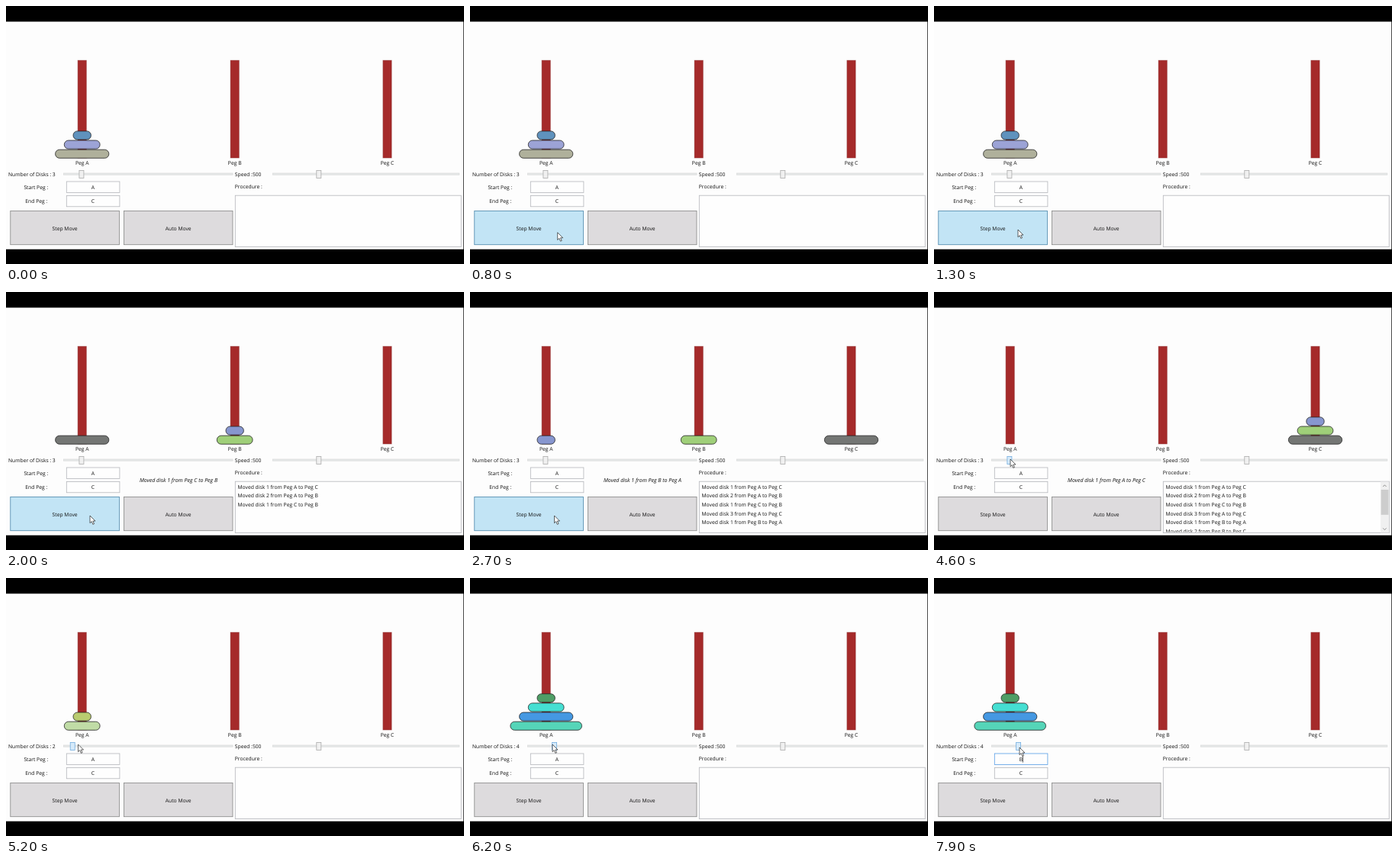
An HTML page that plays this animation: 600 px wide and 338 px high, repeating every 8000 ms.

```html
<!DOCTYPE html>
<html lang="en">
<head>
<meta charset="utf-8">
<title>Disks and pegs</title>
<style>
  html, body { margin: 0; width: 100%; height: 100%; overflow: hidden; background: #000; }
  svg { display: block; width: 100vw; height: 100vh; }
  text { font: 6.75px "Open Sans", "Noto Sans", sans-serif; fill: #111; text-rendering: geometricPrecision; }
  .mid { text-anchor: middle; }
  .note { font-size: 7px; font-style: italic; }
</style>
</head>
<body>
<svg id="stage" viewBox="0 0 600 338"></svg>
<script>
const LOOP = 8000, STEP = 100;
const PEGS = { A: 99.7, B: 299.7, C: 499.5 };
const MOVES = ['1AC', '2AB', '1CB', '3AC', '1BA', '2BC', '1AC'];
const FIRST_MOVE = 1400, MOVE_GAP = 300;

// Each entry starts a fresh stack; colours run from smallest to largest disk.
const STACKS = [
  { at: 0, colors: ['#5f92bd', '#9ca3d6', '#afb09b'] },
  { at: FIRST_MOVE, colors: ['#8796cf', '#9fcf79', '#747674'] },
  { at: 5000, colors: ['#b9cc70', '#c0dca6'] },
  { at: 5500, colors: ['#c48f9f', '#86b7c9', '#d0b26c'] },
  { at: 5900, colors: ['#4f9e66', '#45dfd2', '#4598e2', '#55d5b8'] }
];
const CLEAR_AT = 5000;

// time, x, y
const POINTER = [
  [500, 140, 317], [900, 110, 293], [2000, 110, 293], [2700, 110.5, 293],
  [3300, 110.5, 293], [3800, 135, 247], [4000, 134, 250], [4600, 100, 219],
  [4900, 98, 218], [5200, 94.5, 218], [5400, 96, 218], [6200, 108, 218],
  [6600, 108, 218], [6900, 119, 237], [7500, 119, 237], [7800, 112, 222]
];
const DRAG = [4700, 6600];
const FOCUS_AT = 7000, ERASE_AT = 7400, TYPE_AT = 7600;

const rect = (x, y, w, h, fill, stroke = 'none', extra = '') =>
  `<rect x="${x}" y="${y}" width="${w}" height="${h}" fill="${fill}" stroke="${stroke}" stroke-width=".8" ${extra}/>`;
const label = (x, y, s, cls = '') => `<text x="${x}" y="${y + 2.4}" class="${cls}">${s}</text>`;
const path = (d, attrs) => `<path d="${d}" ${attrs}/>`;
const inside = (p, x, y, w, h) => p && p.x >= x && p.x <= x + w && p.y >= y && p.y <= y + h;

function pointerAt(t) {
  if (t < POINTER[0][0]) return null;
  const i = POINTER.findIndex(k => k[0] > t);
  if (i < 0) { const [, x, y] = POINTER.at(-1); return { x, y }; }
  const [t0, x0, y0] = POINTER[i - 1], [t1, x1, y1] = POINTER[i];
  const u = (t - t0) / (t1 - t0), e = u * u * (3 - 2 * u);
  return { x: x0 + (x1 - x0) * e, y: y0 + (y1 - y0) * e };
}

function disks(colors, done) {
  const stacks = { A: colors.map((_, i) => i + 1).reverse(), B: [], C: [] };
  for (const [, from, to] of done) stacks[to].push(stacks[from].pop());
  return Object.entries(stacks).map(([peg, stack]) => stack.map((size, row) => {
    const w = 23.4 * size;
    return rect(PEGS[peg] - w / 2, 188.2 - 12.15 * row, w, 11.1, colors[size - 1], '#222', 'rx="5.5"');
  }).join('')).join('');
}

function slider(x, w, thumb, hot) {
  return rect(x, 219, w, 2.2, '#e7eaea', '#d6d6d6', 'stroke-opacity=".8"') +
    rect(thumb - 3, 215.4, 6, 10.2, hot ? '#d6eafa' : '#f0f0f0', hot ? '#74aee0' : '#acacac');
}

function textBox(y, value, hot, focused) {
  const border = focused ? '#569de5' : hot ? '#7eb4ea' : '#b4b6bb';
  return rect(79.3, y, 69.6, 14.4, '#fefefe', border) + label(114, y + 7.3, value, 'mid');
}

function button(x, s, hot) {
  return rect(x, 268.4, 142.6, 44.3, hot ? '#c2e4f5' : '#dddbdd', hot ? '#4a86ab' : '#868686') +
    label(x + 71.3, 291.2, s, 'mid');
}

const sentence = ([disk, from, to]) => `Moved disk ${disk} from Peg ${from} to Peg ${to}`;

function procedure(done) {
  const rows = done.map((m, i) => label(303.5, 255.4 + 11.65 * i, sentence(m))).join('');
  let bar = '';
  if (done.length > 5) {
    const arrow = 'fill="none" stroke="#777" stroke-width=".8"';
    bar = rect(585, 248.6, 11, 66.8, '#f0f0f0') +
      rect(585.6, 259, 9.8, 46 * 5 / done.length, '#cdcdcd') +
      path('M588.2 255l2.2-2.2 2.2 2.2', arrow) + path('M588.2 309.4l2.2 2.2 2.2-2.2', arrow);
  }
  return rect(300.3, 248.2, 295.9, 67.4, '#fefefe', '#b4b6bb') +
    `<g clip-path="url(#list)">${rows}</g>` + bar;
}

function cursor(p, beam) {
  if (!p) return '';
  const place = `transform="translate(${p.x.toFixed(2)} ${p.y.toFixed(2)})"`;
  return beam
    ? path('M-2-5.2h1.4l.6.6.6-.6h1.4M0-4.6v9.2M-2 5.2h1.4l.6-.6.6.6h1.4', place + ' fill="none" stroke="#222" stroke-width=".7"')
    : path('M0 0v9.7l2.2-2.1 1.6 3.8 1.7-.7-1.6-3.7h3.1z', place + ' fill="#fff" stroke="#111" stroke-width=".65"');
}

function scene(t) {
  const p = pointerAt(t);
  const { colors } = STACKS.findLast(s => s.at <= t);
  const count = t >= CLEAR_AT ? 0 : Math.max(0, Math.floor((t - FIRST_MOVE) / MOVE_GAP) + 1);
  const done = MOVES.slice(0, count);
  const thumb = 98.9 + 11.7 * (colors.length - 3);
  const dragging = t >= DRAG[0] && t < DRAG[1];
  const overStart = inside(p, 79, 230, 70, 14.5), overEnd = inside(p, 79, 247, 70, 16);
  const beam = !dragging && (overStart || inside(p, 79, 249, 70, 14));
  const focused = t >= FOCUS_AT;
  const start = t >= TYPE_AT ? 'B' : t >= ERASE_AT ? '' : 'A';
  const caretX = start ? 116.4 : 114;

  return rect(0, 20.5, 599.3, 298.2, '#fdfdfd') +
    Object.entries(PEGS).map(([name, x]) =>
      rect(x - 5.6, 71.2, 11.2, 127.8, '#a52a2a', '#8d2c2c', 'stroke-opacity=".6"') +
      label(x, 205.3, 'Peg ' + name, 'mid')).join('') +
    disks(colors, done) +
    label(3, 220.3, 'Number of Disks :') + label(60.8, 220.3, colors.length) +
    slider(75.5, 221.5, thumb, dragging || inside(p, thumb - 4, 214, 8, 13)) +
    label(299.8, 220.3, 'Speed :500') + slider(349.3, 244.5, 409.8, false) +
    label(39.3, 237.3, 'Start Peg :', 'mid') + textBox(230, start, overStart, focused) +
    label(39.8, 256, 'End Peg :', 'mid') + textBox(248.4, 'C', overEnd, false) +
    (focused ? path(`M${caretX} 233.2v8.4`, 'stroke="#111" stroke-width=".7"') : '') +
    label(299.8, 236.8, 'Procedure :') +
    (count ? label(226, 246.3, sentence(done.at(-1)), 'mid note') : '') +
    button(5.8, 'Step Move', inside(p, 5.8, 268, 143, 45)) + button(154.4, 'Auto Move', false) +
    procedure(done) + cursor(p, beam);
}

const stage = document.getElementById('stage');
stage.innerHTML = '<defs><clipPath id="list"><rect x="301" y="249" width="294" height="65.6"/></clipPath></defs><g></g>';
const layer = stage.querySelector('g');
let shown = -1;

function draw(now) {
  const t = Math.floor((now % LOOP) / STEP) * STEP;
  if (t !== shown) layer.innerHTML = scene(shown = t);
  requestAnimationFrame(draw);
}
draw(performance.now());
</script>
</body>
</html>
```
